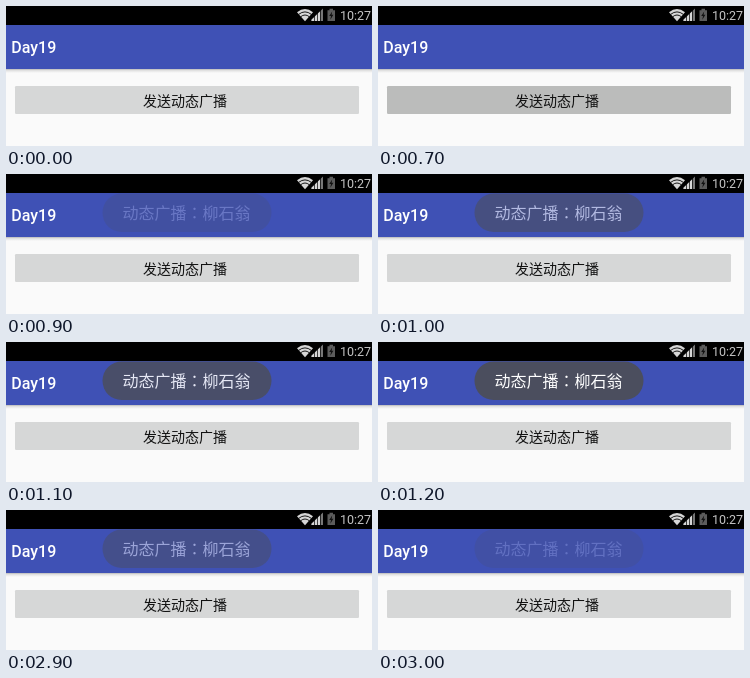
An HTML page that plays this animation: 366x140 px, repeating every 3.1 s.

```html
<!DOCTYPE html>
<html lang="zh-CN">
<head>
<meta charset="utf-8">
<title>Day19</title>
<style>
  html, body { margin: 0; width: 100%; height: 100%; overflow: hidden; background: #fafafa; }
  svg { display: block; width: 366px; height: 140px; }
  .latin { font-family: Roboto, "Noto Sans", sans-serif; }
  .cjk { font-family: "Noto Sans CJK SC", "Noto Sans CJK", sans-serif; }
  .mid { font-family: "Noto Sans CJK TC", "Noto Sans CJK", sans-serif; }
</style>
</head>
<body>
<svg viewBox="0 0 366 140">
  <defs>
    <linearGradient id="shade" x1="0" y1="0" x2="0" y2="1">
      <stop offset="0" stop-color="#000" stop-opacity=".26"/>
      <stop offset=".4" stop-color="#000" stop-opacity=".09"/>
      <stop offset="1" stop-color="#000" stop-opacity="0"/>
    </linearGradient>
  </defs>
  <rect width="366" height="140" fill="#fafafa"/>
  <rect y="19" width="366" height="44" fill="#3f51b5"/>
  <rect y="63" width="366" height="4" fill="url(#shade)"/>
  <rect width="366" height="19"/>

  <!-- wifi -->
  <path d="M291 6.2Q299 -.2 307 6.2L299 15.3Z" fill="#d6d6d6"/>
  <g fill="none" stroke="#000" stroke-width=".9">
    <path d="M292.6 8.4Q299 3.4 305.4 8.4"/>
    <path d="M294.6 10.8Q299 7.2 303.4 10.8"/>
  </g>
  <!-- signal -->
  <path d="M305.5 15V13.8L317 2.5V15Z" fill="#777"/>
  <path d="M305.5 15V13.8L314 5.4V15Z" fill="#d6d6d6"/>
  <path d="M308.5 9V15M311.5 6V15M314.5 3V15" stroke="#000" stroke-width=".7"/>
  <!-- battery -->
  <path d="M321.5 4.2H323.5V2.8H327V4.2H329V15H321.5Z" fill="#5c5c5c"/>
  <path d="M326.2 5.4L323.2 10H325L324.3 13.8L327.4 8.8H325.6Z" fill="#111"/>
  <text class="latin" x="334" y="14" font-size="12.5" fill="#c4c4c4">10:27</text>

  <text class="latin" x="5.3" y="47" font-size="16" font-weight="500" fill="#fff">Day19</text>

  <rect id="button" x="9" y="80" width="344" height="28" rx="1.2"/>
  <text class="cjk" x="137" y="99.5" font-size="14" fill="#111">发送动态广播</text>

  <g id="toast">
    <rect x="96.5" y="19.5" width="169" height="38.5" rx="19.2" fill="#4b4e5e"/>
    <text class="cjk" x="116.5" y="45" font-size="16" fill="#fff">动态广播<tspan class="mid" lang="zh-TW">：</tspan>柳石翁</text>
  </g>
</svg>
<script>
  const LOOP = 3100;
  const button = document.getElementById("button");
  const toast = document.getElementById("toast");

  // [start in ms, toast opacity]
  const fades = [[0, 0], [900, .22], [1000, .6], [1100, .87], [1200, 1],
                 [2800, .78], [2900, .48], [3000, .18]];

  function draw(t) {
    const pressed = t >= 700 && t < 800;
    button.setAttribute("fill", pressed ? "#bbbcbb" : "#d6d7d7");
    toast.setAttribute("opacity", fades.filter(([start]) => t >= start).pop()[1]);
  }

  const begin = performance.now();
  function tick() {
    draw((performance.now() - begin) % LOOP);
    requestAnimationFrame(tick);
  }
  tick();
</script>
</body>
</html>
```
